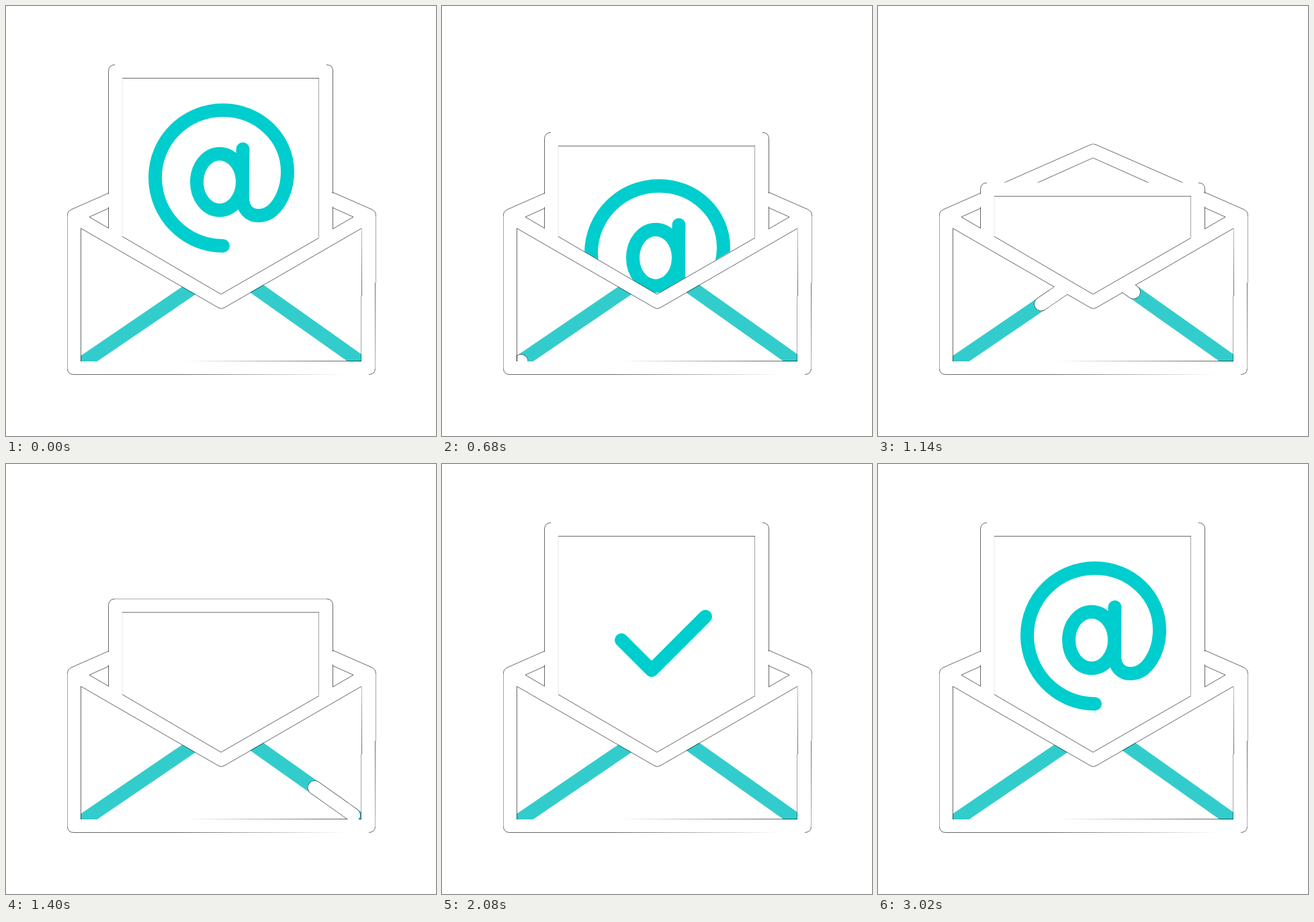
Recreate the animation shown at these times as an HTML page. Size 640x640 px, loop 3600 ms.

```html
<!DOCTYPE html>
<html lang="en">
<head>
<meta charset="utf-8">
<title>Envelope</title>
<style>
  html, body { margin: 0; width: 100%; height: 100%; overflow: hidden; background: #fff; }
  svg { display: block; width: 100vw; height: 100vh; }
  .edge { fill: none; stroke: #000; stroke-width: .6; }
  .soft { stroke-opacity: .6; }
  .faint { stroke-opacity: .15; }
  .bar { fill: none; stroke-width: 20; stroke-linejoin: round; }
  .round { stroke-linecap: round; }
  .teal { stroke: #00cdcd; }
  .fold { stroke: #33cccc; stroke-width: 20.6; }
  .white { stroke: #fff; }
  .rim { stroke: #222; stroke-width: 21; }
</style>
</head>
<body>
<svg viewBox="0 0 640 640">
  <defs>
    <clipPath id="aboveFlap"><path d="M0 0H640V242L320 429L0 241Z"/></clipPath>
    <clipPath id="front"><path d="M111 331L320 451L529 331V529H111Z"/></clipPath>
    <clipPath id="frontWide"><path d="M112 322L320 441L528 322V530H112Z"/></clipPath>
    <linearGradient id="bottomInner" gradientUnits="userSpaceOnUse" x1="265" x2="480" y1="0" y2="0">
      <stop stop-opacity="0"/><stop offset="1"/>
    </linearGradient>
    <linearGradient id="bottomOuter" gradientUnits="userSpaceOnUse" x1="250" x2="505" y1="0" y2="0">
      <stop/><stop offset="1" stop-opacity="0"/>
    </linearGradient>
    <linearGradient id="rightInner" gradientUnits="userSpaceOnUse" x1="0" x2="0" y1="331" y2="432">
      <stop stop-opacity=".4"/><stop offset="1"/>
    </linearGradient>
    <linearGradient id="rightOuter" gradientUnits="userSpaceOnUse" x1="0" x2="0" y1="412" y2="540">
      <stop/><stop offset="1" stop-opacity=".5"/>
    </linearGradient>
  </defs>

  <!-- back flap and letter -->
  <path class="edge" d="M91.500 312Q91 306 97 303L315 207Q320 204 326 207L545 303Q550.500 306 550.500 312"/>
  <g clip-path="url(#aboveFlap)">
    <path class="edge" d="M124 314L320 226L517 314"/>
    <g class="letter">
      <rect x="153" y="87" width="333" height="400" rx="10" fill="#fff"/>
      <path class="edge" d="M152.500 450V97Q153 87.500 162 87.500M477 87.500Q486.500 87.500 486.500 97V450"/>
      <path id="topEdge" class="edge soft" d="M162 87.500H477"/>
    </g>
    <path class="white" fill="none" stroke-width="18" d="M101 312L320 215.500L539 312"/>
    <g class="letter">
      <path class="edge" d="M173 107.500H466"/>
      <path class="edge soft" d="M465.500 107.500V450"/>
      <path class="edge faint" d="M173 107.500V450"/>
    </g>
    <path id="at" class="bar round teal" pathLength="1"
      d="M352.500 213L352 262A34 42 0 0 0 284 262A34 42 0 0 0 352 262V285C352 302 362 312 376 312C402 312 419 278 419 247C419 196 376 155 323 155C267 155 222 200 222 255C222 311 267 357 323 357"/>
    <path id="check" class="bar round teal" pathLength="1" d="M267 262L312 307L392 227"/>
  </g>

  <!-- front of the envelope -->
  <g clip-path="url(#front)">
    <path class="bar fold" d="M101 540L320 391M320 383L539 538"/>
    <path class="sweep bar round rim" pathLength="1" d="M101 540L320 391V383L539 538"/>
  </g>
  <path class="edge" d="M124 314L153 331M173 343L320 429L466 345M486 332L517 314"/>
  <path class="edge" d="M111.500 529V331L316 449Q320 452 325 449L529 331"/>
  <path class="edge" style="stroke:url(#rightInner)" d="M529.500 331V432"/>
  <path class="edge soft" d="M528.500 432V528.500"/>
  <path class="edge" style="stroke:url(#bottomInner)" d="M265 528.500H529"/>
  <path class="edge soft" d="M91.500 312V540"/>
  <path class="edge" d="M91.500 540Q92 548.500 101 548.500H250"/>
  <path class="edge" style="stroke:url(#bottomOuter)" d="M250 548.500H505"/>
  <path class="edge soft" d="M550.500 312V412"/>
  <path class="edge" style="stroke:url(#rightOuter)" d="M549.500 412V540"/>
  <path class="edge" d="M549.500 540Q549 548 540 548.500"/>
  <g clip-path="url(#frontWide)">
    <path class="sweep bar round white" pathLength="1" d="M101 540L320 391V383L539 538"/>
  </g>
</svg>
<script>
const LOOP = 3600, DEPTH = 200;
const $ = id => document.getElementById(id);
const letters = document.querySelectorAll('.letter');
const sweeps = document.querySelectorAll('.sweep');

const span = (t, from, to) => Math.min(1, Math.max(0, (t - from) / (to - from)));
const smooth = u => u * u * (3 - 2 * u);
const cubic = u => u < .5 ? 4 * u ** 3 : 1 - 4 * (1 - u) ** 3;
const gentle = u => u + .3 * (smooth(u) - u);
const eased = (t, from, to) => smooth(span(t, from, to));

// Shows only the part of a path between two fractions of its length.
function trim(path, start, end) {
  path.style.display = end - start > .001 ? '' : 'none';
  const whole = start <= 0 && end >= 1;
  path.style.strokeDasharray = whole ? 'none' : `${end - start} 9`;
  path.style.strokeDashoffset = -start;
}

const letterY = t => DEPTH * (cubic(span(t, 340, 1020)) - gentle(span(t, 1010, 1895)));

function draw(t) {
  const y = letterY(t);
  letters.forEach(el => el.setAttribute('transform', `translate(0 ${y.toFixed(2)})`));
  $('topEdge').style.display = t > 1400 && t < 1880 ? '' : 'none';

  $('at').setAttribute('transform', `translate(0 ${letterY(t + 14).toFixed(2)})`);
  trim($('at'), 0, 1 - eased(t, 740, 1120) + eased(t, 2600, 3020));
  trim($('check'), eased(t, 2240, 2640), eased(t, 1535, 1935));
  sweeps.forEach(el => trim(el, eased(t, 865, 1600), eased(t, 570, 1530)));
}

const begin = performance.now();
function tick() {
  draw((performance.now() - begin) % LOOP);
  requestAnimationFrame(tick);
}
tick();
</script>
</body>
</html>
```
